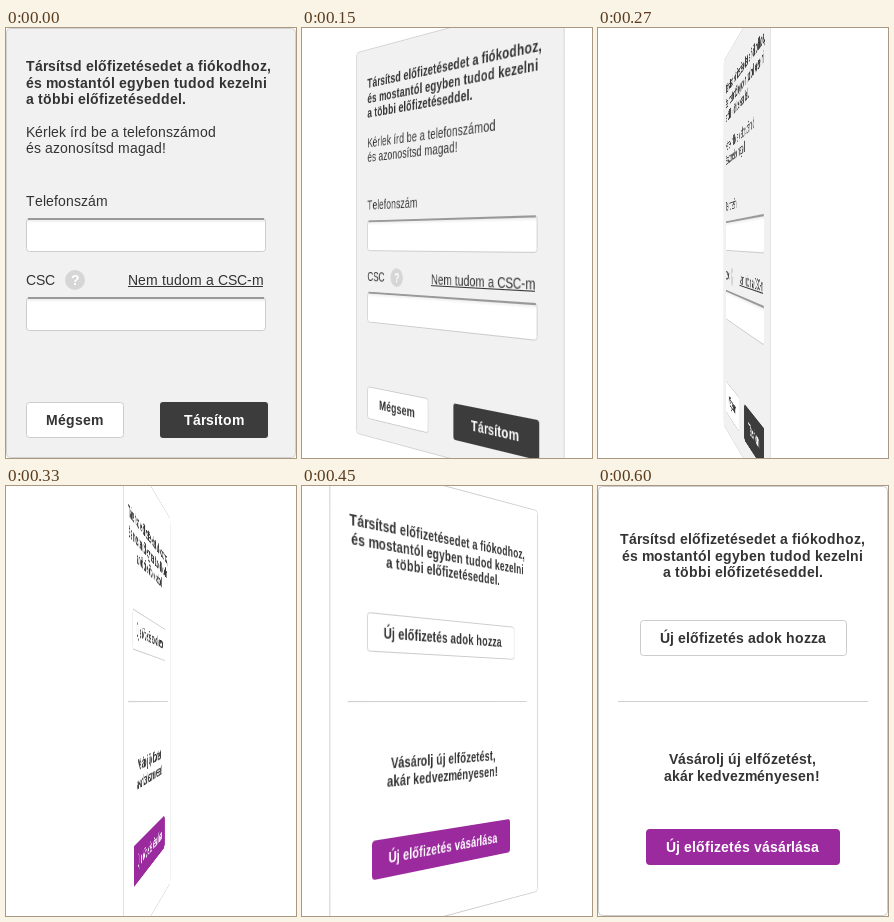
An HTML page that plays this animation: 290 by 430 pixels, repeating every 0.63 s.

```html
<!DOCTYPE html>
<html lang="hu">
<head>
<meta charset="utf-8">
<title>Card flip</title>
<style>
  html, body { margin: 0; width: 100%; height: 100%; overflow: hidden; background: #fff; }
  svg { position: absolute; left: 0; top: 0; width: 290px; height: 430px; backface-visibility: hidden; will-change: transform; }
  text { font: 14px "Liberation Sans", Arial, sans-serif; font-kerning: none; fill: #333; white-space: pre; }
  .b { font-weight: bold; }
  .w { fill: #fff; }
  .box { fill: #fff; stroke: #ccc; }
</style>
</head>
<body>
<svg id="front" viewBox="0 0 290 430">
  <defs>
    <linearGradient id="shade" x2="0" y2="1">
      <stop offset="0" stop-color="#e6e6e6"/>
      <stop offset=".15" stop-color="#fff"/>
    </linearGradient>
    <g id="field">
      <rect class="box" x=".5" y=".5" width="239" height="33" rx="3" style="fill: url(#shade)"/>
      <path d="M2 1H238" stroke="#999" stroke-width="2"/>
    </g>
  </defs>
  <rect x=".5" y=".5" width="289" height="429" rx="4" fill="#f1f1f1" stroke="#d2d2d2"/>
  <text class="b" x="20" y="43">Társítsd előfizetésedet a fiókodhoz,</text>
  <text class="b" x="20" y="60">és mostantól egyben tudod kezelni</text>
  <text class="b" x="20" y="76">a többi előfizetéseddel.</text>
  <text x="20" y="109">Kérlek írd be a telefonszámod</text>
  <text x="20" y="125">és azonosítsd magad!</text>
  <text x="20" y="178">Telefonszám</text>
  <use href="#field" x="20" y="190"/>
  <text x="20" y="257">CSC</text>
  <circle cx="69" cy="252" r="10" fill="#d6d6d6"/>
  <text class="b w" x="65" y="257">?</text>
  <text x="122" y="257">Nem tudom a CSC-m</text>
  <path d="M122 258.5H257" stroke="#333"/>
  <use href="#field" x="20" y="269"/>
  <rect class="box" x="20.5" y="374.5" width="97" height="35" rx="3"/>
  <text class="b" x="40" y="397">Mégsem</text>
  <rect x="154" y="374" width="108" height="36" rx="3" fill="#3c3c3c"/>
  <text class="b w" x="178" y="397">Társítom</text>
</svg>
<svg id="back" viewBox="0 0 290 430">
  <rect class="box" x=".5" y=".5" width="289" height="429" rx="4"/>
  <text class="b" x="22" y="58">Társítsd előfizetésedet a fiókodhoz,</text>
  <text class="b" x="24" y="75">és mostantól egyben tudod kezelni</text>
  <text class="b" x="65" y="91">a többi előfizetéseddel.</text>
  <rect class="box" x="42.5" y="134.5" width="206" height="35" rx="3"/>
  <text class="b" x="62" y="157">Új előfizetés adok hozza</text>
  <path d="M20 215.5H270" stroke="#d0d0d0"/>
  <text class="b" x="71" y="278">Vásárolj új elfőzetést,</text>
  <text class="b" x="66" y="295">akár kedvezményesen!</text>
  <rect x="48" y="343" width="194" height="36" rx="4" fill="#9b2a9f"/>
  <text class="b w" x="68" y="366">Új előfizetés vásárlása</text>
</svg>
<script>
  const LOOP = 630, STEP = 30, TURN = 9;
  const front = document.getElementById('front');
  const back = document.getElementById('back');

  // Snap every glyph advance to whole pixels.
  const pen = document.createElement('canvas').getContext('2d');
  for (const text of document.querySelectorAll('text')) {
    pen.font = (text.classList.contains('b') ? 'bold ' : '') + '14px "Liberation Sans", Arial, sans-serif';
    let x = +text.getAttribute('x');
    const places = [...text.textContent].map(ch => {
      const at = x;
      x += Math.round(pen.measureText(ch).width);
      return at;
    });
    text.setAttribute('x', places.join(' '));
  }

  const turn = (face, angle) => {
    face.style.transform = `perspective(800px) rotateY(${angle}deg)`;
  };

  function draw() {
    const angle = Math.floor(performance.now() % LOOP / STEP) * TURN;
    turn(front, -angle);
    turn(back, 180 - angle);
    requestAnimationFrame(draw);
  }
  draw();
</script>
</body>
</html>
```
